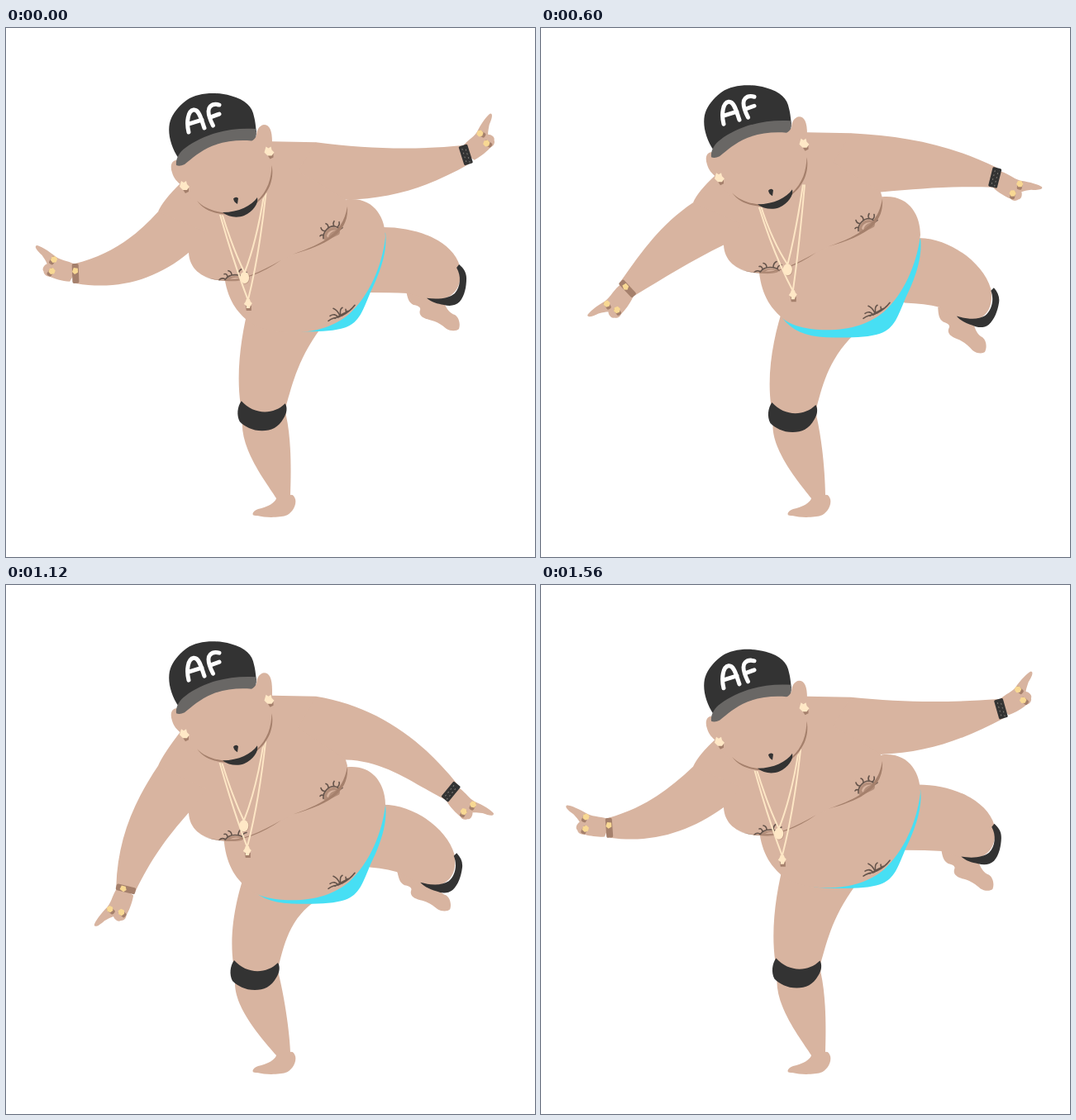
Animation of 640 by 640 pixels, one loop 1600 ms. Source, as an HTML page:

```html
<!DOCTYPE html>
<html lang="en">
<head>
<meta charset="utf-8">
<title>Balancing dancer</title>
<style>
  html, body { margin: 0; width: 100%; height: 100%; overflow: hidden; background: #fff; }
  svg { display: block; width: 100vw; height: 100vh; }
  .skin { fill: #d8b4a0; }
  .dark { fill: #333; }
  .shade { fill: #a5806c; }
  .cream { fill: #ffe8c6; }
  .line { fill: none; stroke-linecap: round; stroke-linejoin: round; }
  .hair { stroke: #65544b; stroke-width: 1.6; }
  .chain { stroke: #fde6c5; stroke-width: 2; }
</style>
</head>
<body>
<svg viewBox="0 0 640 640" aria-label="Dancer balancing on one leg">
  <defs>
    <g id="hand">
      <path class="skin" d="M2-9C14-9 22-3 31-3C42-4 55-3 58-1C60 2 54 4 46 5C41 7 38 8 35 10C37 13 37 19 33 20C31 23 26 23 24 21C18 20 8 17 0 12Z"/>
      <g id="ring">
        <rect class="shade" x="28.500" y="-2" width="6" height="10" rx="2"/>
        <path fill="#f8d893" d="M28-2L32-3L35 0L34 4L30 5L27 2Z"/>
      </g>
      <use href="#ring" x="-6" y="13"/>
    </g>
  </defs>

  <path id="backFoot" class="skin" d="M484 318C486 327 487 332 493 335C499 336 502 338 501 341C499 347 503 351 512 353C522 355 528 360 533 364C538 367 545 367 548 364C550 358 548 350 543 347C537 345 534 341 530 333L520 316Z"/>
  <path id="backLeg" class="skin"/>
  <path id="backPad" class="dark" d="M548 286C554 291 557 296 557 303C557 313 555 324 549 331C544 336 537 337 530 335C522 334 515 332 509 327C524 329 536 327 543 321C550 313 551 300 545 290Z"/>

  <path id="leg" class="skin"/>
  <path id="pad" class="dark" d="M286 451C301 468 325 468 339 454C342 459 341 466 337 472C331 483 322 487 311 487C299 487 290 482 284 476C280 468 281 458 286 451Z"/>

  <path id="pants" fill="#47dff4" d="M459 257C462 280 452 307 441 329C432 350 428 366 410 372C395 377 372 377 345 376.500C320 375.500 303 368 292 353Z"/>
  <g id="belly">
    <path class="skin" d="M263 290C264 325 275 343 289 356C300 368 323 373 345 373C377 373 398 365 415 351C440 328 455 292 459 258C459 235 446 209 413 212Z"/>
    <path class="line hair" stroke-width="2" d="M404 354Q396 355 390 359M402 355Q398 349 392 353M404 353Q401 346 396 344M405 353Q403 345 407 343M406 352Q413 350 411 345M406 353Q416 348 422 340M398 356L414 347"/>
  </g>

  <path id="torso" class="skin"/>
  <path id="armL" class="skin"/>
  <path id="armR" class="skin"/>

  <g id="chest">
    <path class="shade" d="M385 254C384 246 391 239 399 241C404 242 405 246 403 249C398 252 391 255 385 256Z" opacity=".75"/>
    <path class="skin" d="M388 251C389 246 394 243 399 244Q391 246 390 253Z"/>
    <path class="line hair" d="M384 254C383 246 390 239 397 239Q402 240 404 243M384 250Q381 249 380 251M386 245Q382 245 381 241M390 241Q390 237 387 236M397 239Q395 236 397 233M401 240Q404 238 403 234M404 243L407 241"/>
    <path class="shade" d="M265 305C269 299 278 298 288 302L286 304C280 306 272 306 265 305Z" opacity=".75"/>
    <path class="skin" d="M271 303Q278 299 285 303Z"/>
    <path class="line hair" d="M265 304Q269 298 277 298T288 302M265 303Q261 301 258 304M268 300Q267 296 264 297M273 298Q273 294 269 293M281 298Q281 293 285 291M286 300Q286 296 291 295"/>
    <path class="shade" d="M237 299C268 311 295 302 333 280C297 305 264 311 237 299Z"/>
    <path class="shade" d="M347 273C391 258 408 244 413 215C415 244 395 260 347 273Z"/>
  </g>

  <path id="chainA" class="line chain"/>
  <path id="chainB" class="line chain"/>
  <g id="medal">
    <ellipse class="shade" cx=".8" cy=".6" rx="5.500" ry="7" opacity=".5"/>
    <ellipse class="cream" rx="5.500" ry="7"/>
  </g>
  <g id="cross">
    <path class="shade" d="M-3 1H4V7H-2Z"/>
    <path class="cream" d="M-2-7H2L3-4L5-2L3 1L2 4H-2L-2 1L-5-1L-3-4Z"/>
  </g>

  <g id="head">
    <path class="skin" d="M210 160C200 158 198 167 201 175C203 182 207 186 212 190C222 211 240 227 272 227C304 226 322 200 322 165V138C322 124 319 117 312 117C306 118 303 124 303 131L290 126L220 140Z"/>
    <path class="shade" d="M231 209C240 218 251 222 265 223.500V225.500C250 224 239 220 231 209Z"/>
    <path class="shade" d="M303 210C317 197 321 182 321.500 166C325 184 317 201 303 212Z"/>
    <path class="dark" d="M275 206.500Q278 203 281 206L280 213Q276 211 275 206.500Z"/>
    <path class="dark" d="M262 223C282 223 297 215 304 205C306 212 299 222 288 227C280 230 269 229 262 223Z"/>
    <g id="stud">
      <path class="shade" d="M213 194L221 192L221 198L217 200Z"/>
      <path class="cream" d="M212 185L215 187L218 185L219 189L222 192L219 196L214 196L210 192Z"/>
    </g>
    <use href="#stud" x="102.500" y="-41.500"/>
    <path class="dark" d="M209 158C198 142 194 122 200 109C204 100 212 92 219 87C232 78 255 77 272 82C290 87 298 95 300 107C302 115 302 119 303 126L250 140Z"/>
    <path fill="#696765" d="M206 166C205 158 210 150 217 145C238 129 268 120 302 122C304 128 303 134 297 136.500C281 135 264 137 250 142.500C234 149 225 158 216 165Q210 168 206 166Z"/>
    <path class="line" stroke="#fff" stroke-width="5" d="M221 126C218 114 220 100 227 99C234 98 237 113 240 121M221 116L237 111M250.500 118C246 109 243 99 247 95Q251 91 258 93M247 108L258 104"/>
  </g>

  <use id="handL" href="#hand"/>
  <use id="handR" href="#hand"/>
  <g id="bandL">
    <rect class="shade" x="-4" y="-12" width="8" height="24" rx="2"/>
    <path fill="#f8d893" d="M-3-6L2-7L4-2L1 1L-3-1Z"/>
  </g>
  <g id="bandR">
    <rect class="dark" x="-5.500" y="-12" width="11" height="24" rx="1.500"/>
    <path class="line" stroke="#85817c" stroke-dasharray="1 4" d="M-2-8V9M2-6V10"/>
  </g>
</svg>
<script>
const BEAT = 800, STEP = 40, RAD = Math.PI / 180;
const el = {};
document.querySelectorAll('svg [id]').forEach(e => el[e.id] = e);

const path = (id, d) => el[id].setAttribute('d', d);
const place = (id, x, y, extra = '') => el[id].setAttribute('transform', `translate(${x} ${y}) ${extra}`);
const add = (p, angle, len, side) =>
  [p[0] + side * Math.cos(angle * RAD) * len, p[1] + Math.sin(angle * RAD) * len];

// A curve leaving a at angle s and arriving at b at angle e
function bend(a, s, b, e, side) {
  const k = 0.36 * Math.hypot(b[0] - a[0], b[1] - a[1]);
  return [add(a, s, k, side), add(b, e, -k, side)];
}

// Angles are measured outwards from the body, positive pointing down
function arm(name, side, top, pit, wrist, turn, start, flick) {
  const up = add(wrist, turn - 90, 12, side);
  const low = add(wrist, turn + 90, 12, side);
  const [a, b] = bend(top, start, up, turn + 12, side);
  const [c, d] = bend(pit, start - 8, low, turn - 12, side);
  const core = [(top[0] + pit[0]) / 2 - 40 * side, (top[1] + pit[1]) / 2];
  path('arm' + name, `M${top}C${a} ${b} ${up}L${low}C${d} ${c} ${pit}L${core}Z`);
  place('hand' + name, ...wrist, `scale(${side} 1) rotate(${flick})`);
  place('band' + name, ...wrist, `scale(${side} 1) rotate(${turn})`);
}

function draw(t) {
  const wave = lag => Math.cos(2 * Math.PI * (t - lag) / BEAT);
  const sway = Math.sin(2 * Math.PI * (t - 140) / (2 * BEAT));

  // The bounce travels down the body, each part a little later
  const head = 7.5 * wave(50) - 6.9;
  const shoulder = 8 * wave(130);
  const chest = 8.5 * wave(190);
  const belly = 9 * wave(270);
  const hip = 9.8 * wave(370);

  place('head', 0, head);
  place('chest', 0, chest);
  place('belly', 0, belly);
  place('pants', 0, hip);

  const topL = [184, 218 + shoulder], pitL = [221, 271 + chest];
  const topR = [375, 134 + shoulder], pitR = [411, 207 + chest];
  path('torso', `M322 ${133 + shoulder}L${topR}L${pitR}L413 ${214 + chest}
    C410 ${240 + chest} 395 ${258 + chest} 348 ${273 + chest}
    L333 ${281 + chest}C320 ${290 + chest} 300 ${305 + chest} 265 ${305 + chest}
    C240 ${304 + chest} 222 ${293 + chest} ${pitL}L${topL}
    Q190 ${204 + shoulder} 212 ${187 + head}L300 ${150 + head}Z`);

  arm('L', -1, topL, pitL,
    [114.5 - 32 * wave(-40), 331 - 37.5 * wave(-55)],
    43 - 41 * wave(0), 48 + 14 * wave(200), 17.5 - 55 * wave(40));
  arm('R', 1, topR, pitR,
    [547 + 9.5 * wave(-30), 200.5 - 51 * wave(-50)],
    14 - 31.5 * wave(0), 7 + 4 * wave(200), -5 - 56 * wave(40));

  // Necklaces
  const nx = 3 * sway, medal = [292 + 6.5 * sway, 302 + head];
  const cross = [297 + 8 * sway, 335 + 1.1 * head];
  const chain = (id, l, r, [x, y]) =>
    path(id, `M${l + nx} ${222 + head}Q${(l + x) / 2 - 1} ${(222 + head + y) / 2 + 5} ${x} ${y - 6}
      Q${(r + x) / 2 + 2} ${(206 + head + y) / 2 + 4} ${r + nx} ${200 + head}`);
  chain('chainA', 262, 314, medal);
  chain('chainB', 259.5, 316, cross);
  place('medal', ...medal);
  place('cross', ...cross);

  // Raised leg
  const lift = wave(428) + 0.975, kx = -4 * lift, ky = 23 * lift;
  const thigh = 254.5 + 13.5 * wave(395), heel = wave(405);
  path('backLeg', `M435 ${thigh}H456
    C${497 + kx / 2} ${thigh} ${540 + kx} ${257 + ky} ${549 + kx} ${288 + ky}
    C${553 + kx} ${310 + ky} ${544 + kx} ${333 + ky} ${510 + kx * 1.6} ${328 + ky * 0.9}
    L${482 - 4 * heel} ${337 + 16 * heel}Q465 ${333 + 13 * heel} 440 ${332 + 12 * heel}L420 320Z`);
  place('backPad', kx, ky, `rotate(${5.5 + 6.5 * wave(480)} 545 315)`);
  const kick = wave(460) + 0.89;
  place('backFoot', -8 * kick, 21 * kick, `rotate(${2 + 6.5 * wave(560)} 549 362)`);

  // Standing leg
  const x = -6.2 - 5 * wave(410), y = -0.3 * x;
  place('pad', x, y);
  path('leg', `M294 335C${286 + x / 2} 368 ${279 + x} 415 ${285 + x} ${455 + y}
    L${287 + x} ${479 + y}C${287 + x} 514 ${318 + x / 2} 553 327 569
    C326 574 316 580 305 582C297 585 296 591 304 590C315 593 332 592 338 590
    C345 588 352 578 350 570Q348 564 344 565
    C${345 + x * 0.2} 540 ${347 + x} 500 ${340 + x} ${468 + y}V${457 + y}
    C${348 + x} 430 ${355 + x} 397 386 ${366 + hip}L380 330Z`);
}

const begin = performance.now();
function tick(now) {
  draw(Math.floor(Math.max(0, now - begin) / STEP) * STEP % (2 * BEAT));
  requestAnimationFrame(tick);
}
draw(0);
requestAnimationFrame(tick);
</script>
</body>
</html>
```
